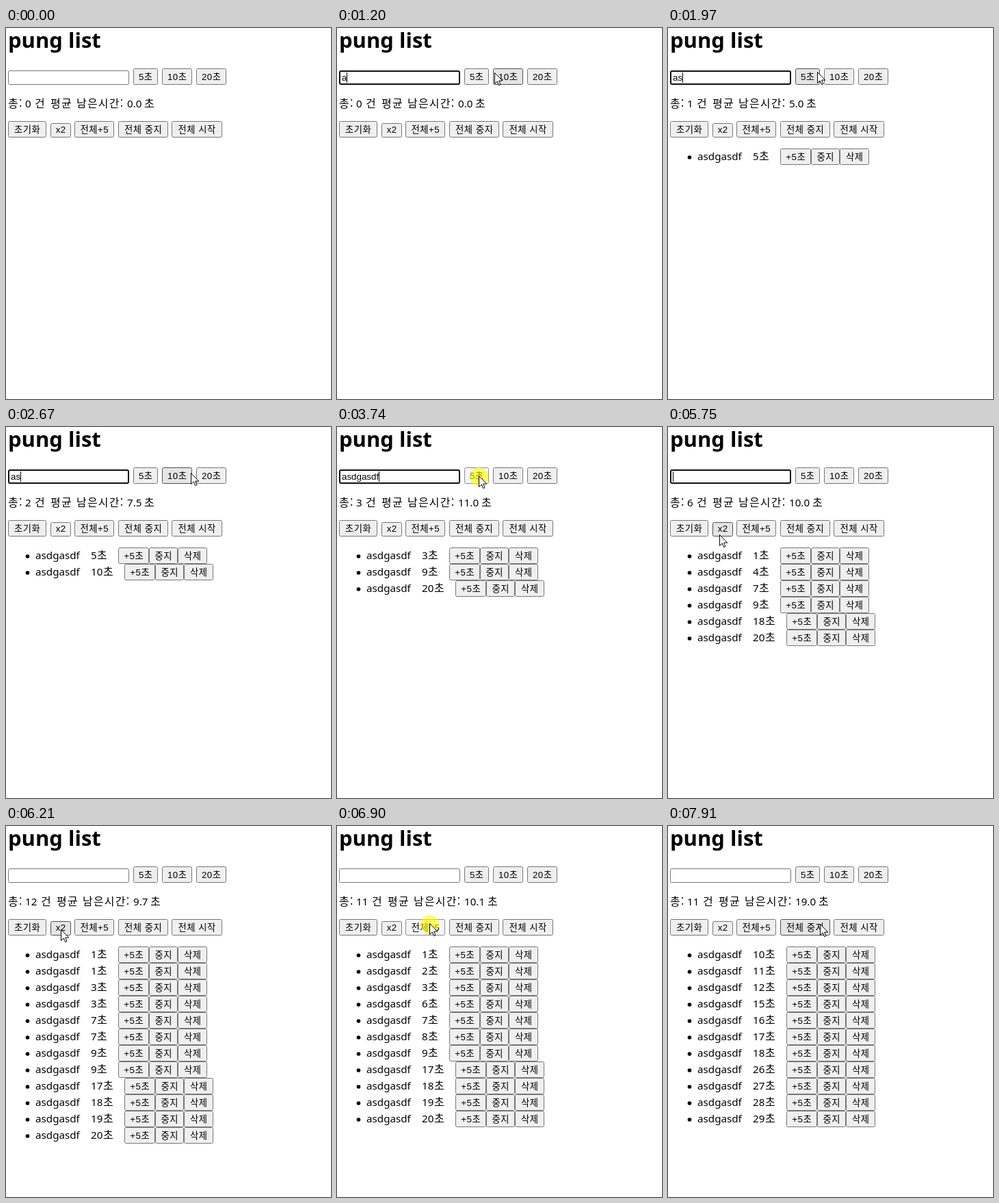
Recreate the animation shown at these times as an HTML page. Size 475 by 542 pixels, loop 7.99 s.

```html
<!DOCTYPE html>
<html lang="ko">
<head>
<meta charset="utf-8">
<style>
  html, body { margin: 0; width: 100%; height: 100%; overflow: hidden; background: #fff; }
  svg { display: block; }
  .title { font: bold 31px "Noto Sans", "Open Sans", sans-serif; }
  .latin { font: 15.2px "Noto Sans", "Open Sans", sans-serif; }
  .hangul { font: 16px "Noto Sans CJK KR", sans-serif; letter-spacing: 1.2px; }
  .field { font: 13.33px "Liberation Sans", sans-serif; }
  .label { font: 13.33px "Liberation Sans", "Noto Sans CJK KR", sans-serif; letter-spacing: .5px; text-anchor: middle; }
</style>
</head>
<body>
<svg id="stage" width="475" height="542" viewBox="0 0 475 542"></svg>
<script>
const LOOP = 7990, START = 198, STEP = 1000 / 13, SECOND = 985, AVERAGE_LAG = 65;
const WORD = 'asdgasdf', KEY_TIME = 60;
const FOCUS = 890, DOUBLE = 6120, PLUS_FIVE = [6960, 7275];

// time added, seconds
const adds = [[1735, 5], [2400, 10], [3200, 20], [3880, 5], [4540, 10], [5150, 20]];
const typingStarts = [1150, 1850, 2580, 3300, 4000, 4650];
const clicks = [FOCUS, ...adds.map(a => a[0]), DOUBLE, ...PLUS_FIVE];

// time, x, y
const path = [
  [198, 372, 523], [800, 120, 72], [960, 120, 72], [1198, 230, 65], [1420, 205, 64],
  [1800, 205, 64], [2250, 248, 64], [2440, 250, 64], [2659, 270, 67], [3000, 298, 68],
  [3220, 298, 68], [3640, 207, 71], [3900, 207, 71], [4350, 252, 71], [4500, 256, 71],
  [4582, 275, 76], [4900, 297, 71], [5180, 297, 71], [5700, 75, 157], [5770, 75, 157],
  [5930, 79, 151], [6160, 79, 151], [6650, 135, 142], [7360, 135, 142], [7890, 222, 143]
];

const buttons = [
  [186, 59, 36, 24, '5초'], [228, 59, 44, 24, '10초'], [278, 59, 44, 24, '20초'],
  [3, 136, 56, 24, '초기화'], [65, 139, 30, 21, 'x2'], [100, 136, 58, 24, '전체+5'],
  [164, 136, 73, 24, '전체 중지'], [242, 136, 74, 24, '전체 시작']
];

const text = (style, x, y, s) => `<text class="${style}" x="${x}" y="${y}">${s}</text>`;
const box = (x, y, w, h, fill, stroke, line = 1) =>
  `<rect x="${x + line / 2}" y="${y + line / 2}" width="${w - line}" height="${h - line}" rx="2" fill="${fill}" stroke="${stroke}" stroke-width="${line}"/>`;

function button([x, y, w, h, label], state = '') {
  const [fill, stroke] = { hover: ['#e5e5e5', '#4f4f4f'], down: ['#f5f5f5', '#8d8d8d'] }[state] || ['#efefef', '#767676'];
  return box(x, y, w, h, fill, stroke) + text('label', x + w / 2 + .25, y + (h < 24 ? 14 : 17), label);
}

const inside = (p, [x, y, w, h], pad = 0) =>
  p.x >= x - pad && p.x <= x + w + pad && p.y >= y && p.y <= y + h;

function pointerAt(t) {
  if (t < START) return null;
  const i = path.findIndex(k => k[0] > t);
  if (i < 1) return { x: path.at(-1)[1], y: path.at(-1)[2] };
  const [a, b] = [path[i - 1], path[i]];
  const u = (t - a[0]) / (b[0] - a[0]), e = u * u * (3 - 2 * u);
  return { x: a[1] + (b[1] - a[1]) * e, y: a[2] + (b[2] - a[2]) * e };
}

const left = ([start, seconds], t) => seconds - Math.floor(Math.max(0, t - start) / SECOND);

function timersAt(t) {
  let list = adds.filter(a => a[0] <= t);
  if (t >= DOUBLE) list = list.concat(adds.map(a => [DOUBLE, left(a, DOUBLE)]));
  const bonus = 5 * PLUS_FIVE.filter(c => c <= t).length;
  return list.filter(a => left(a, Math.min(t, PLUS_FIVE[0])) > 0)
    .map(a => ({ now: left(a, t) + bonus, counted: left(a, t - AVERAGE_LAG) + bonus }))
    .sort((a, b) => a.now - b.now);
}

function field(t) {
  if (t < FOCUS || t >= DOUBLE - 100) return box(3, 62, 177, 21, '#fff', '#767676');
  const i = typingStarts.findLastIndex(s => s <= t);
  const typed = i < 0 || t >= adds[i][0] ? '' : WORD.slice(0, Math.floor((t - typingStarts[i]) / KEY_TIME) + 1);
  const width = [...typed].reduce((w, c) => w + ({ s: .5, f: .278 }[c] || .556) * 13.33, 0);
  return box(3, 62, 177, 21, '#fff', '#101010', 2) + text('field', 7, 77, typed) +
    `<rect x="${7 + Math.round(width)}" y="65" width="1" height="15"/>`;
}

function summary(timers) {
  const count = String(timers.length);
  const sum = timers.reduce((s, v) => s + v.counted, 0);
  const average = (sum / (timers.length || 1)).toFixed(1);
  const d = 9 * (count.length - 1), e = d + 9 * (average.length - 3);
  return [
    ['hangul', 3, '총:'], ['latin', 28, count], ['hangul', 42 + d, '건'], ['hangul', 65 + d, '평균'],
    ['hangul', 103 + d, '남은시간:'], ['latin', 177 + d, average], ['hangul', 202 + e, '초']
  ].map(([style, x, s]) => text(style, x, 116, s)).join('');
}

function row({ now }, i) {
  const y = 176 + 24 * i, d = 9 * String(now).length;
  return `<circle cx="31.5" cy="${y + 13}" r="2.8"/>` +
    text('latin', 43, y + 17, WORD) + text('latin', 124, y + 17, now) + text('hangul', 124 + d, y + 17, '초') +
    button([155 + d, y, 45, 24, '+5초']) + button([200 + d, y, 42, 24, '중지']) + button([242 + d, y, 43, 24, '삭제']);
}

function pointer(p, pressed) {
  const overText = p.y >= 59 && p.y <= 84 && p.x >= 3 && p.x <= 322 && !buttons.some(b => inside(p, b));
  const shape = overText
    ? '<path d="M-3 -7.5H-1L0 -6.5 1 -7.5H3M0 -6.5V6.5M-3 7.5H-1L0 6.5 1 7.5H3" fill="none" stroke="#000"/>'
    : '<path d="M.5 .5V16.5L4.2 13 6.7 18.6 9 17.6 6.6 12.1H11.8Z" fill="#fff" stroke="#000"/>';
  return `<g transform="translate(${Math.round(p.x)} ${Math.round(p.y)})">` +
    (pressed ? '<circle cx=".5" cy="1.5" r="13.5" fill="#ff0" opacity=".6"/>' : '') + shape + '</g>';
}

function scene(t) {
  const p = pointerAt(t), timers = timersAt(t);
  const pressed = clicks.some(c => t >= c - 150 && t < c);
  const state = b => p && inside(p, b, 3) ? (pressed ? 'down' : 'hover') : '';
  return text('title', 3, 29, 'pung list') + field(t) + summary(timers) +
    buttons.map(b => button(b, state(b))).join('') + timers.map(row).join('') +
    (p ? pointer(p, pressed) : '');
}

const stage = document.getElementById('stage');
let shown = '';
function draw() {
  const t = performance.now() % LOOP;
  const picture = scene(t < START ? 0 : START + Math.floor((t - START) / STEP) * STEP);
  if (picture !== shown) stage.innerHTML = shown = picture;
  requestAnimationFrame(draw);
}
draw();
</script>
</body>
</html>
```
